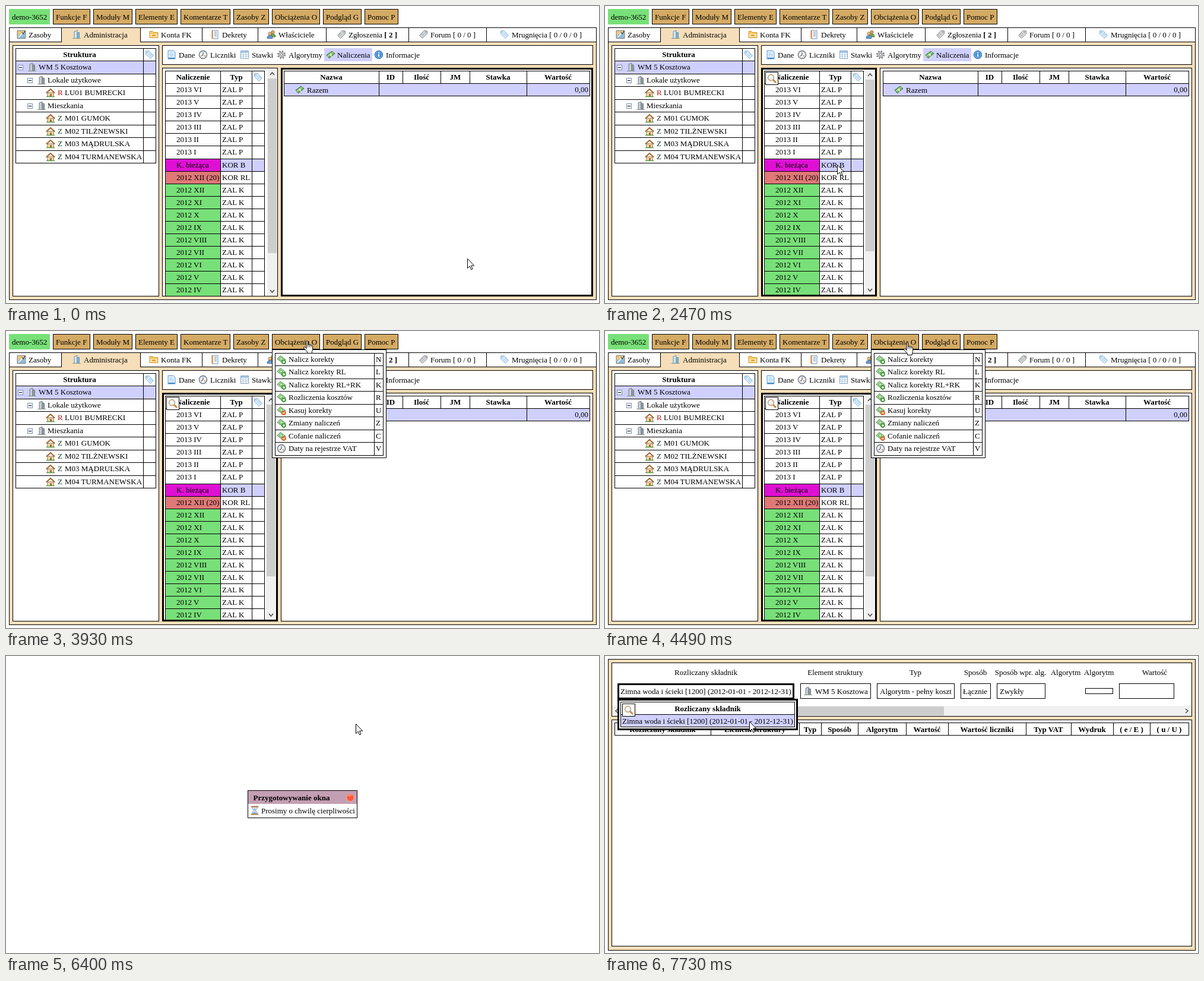
An HTML page for the animation above (8000 ms loop, 999 by 500 pixels).

```html
<!DOCTYPE html>
<html lang="pl">
<head>
<meta charset="utf-8">
<title>Naliczenia</title>
<style>
html, body { margin: 0; width: 100%; height: 100%; overflow: hidden; background: #fff; }
svg { display: block; width: 999px; height: 500px; }
text { font: 13px "Liberation Serif", "Times New Roman", serif; white-space: pre; }
.b { font-weight: bold; }
.m { text-anchor: middle; }
.e { text-anchor: end; }
rect { shape-rendering: crispEdges; }
</style>
</head>
<body>
<svg id="stage" viewBox="0 0 999 500"></svg>
<script>
const LAV = '#d0d0ff', TAN = '#d4ab65', WHEAT = '#f5deb9', GREEN = '#78e078';

// Drawing helpers: right and bottom edges are exclusive
const fill = (x, y, x2, y2, c) => `<rect x="${x}" y="${y}" width="${x2 - x}" height="${y2 - y}" fill="${c}"/>`;
const box = (x, y, x2, y2, c = '#fff', w = 1) => fill(x, y, x2, y2, '#000') + fill(x + w, y + w, x2 - w, y2 - w, c);
const frame = (x, y, x2, y2, w) =>
  `<rect x="${x + w / 2}" y="${y + w / 2}" width="${x2 - x - w}" height="${y2 - y - w}" fill="none" stroke="#000" stroke-width="${w}"/>`;
const text = (x, y, s, cls = '', c = '#000') => `<text x="${x}" y="${y}" class="${cls}" fill="${c}">${s}</text>`;
const grid = (xs, ys) => {
  const [x0, x1, y0, y1] = [xs[0], xs[xs.length - 1], ys[0], ys[ys.length - 1]];
  return xs.map(x => fill(x, y0, x + 1, y1 + 1, '#000')).join('') +
    ys.map(y => fill(x0, y, x1 + 1, y + 1, '#000')).join('');
};
const group = (id, s) => `<g id="${id}">${s}</g>`;
const path = (d, f = 'none', s = 'none', w = 1) => `<path d="${d}" fill="${f}" stroke="${s}" stroke-width="${w}"/>`;
const disc = (x, y, r, f, s = 'none', w = 1) => `<circle cx="${x}" cy="${y}" r="${r}" fill="${f}" stroke="${s}" stroke-width="${w}"/>`;

const note = path('M1 8.5L10 2l5 4-9.5 8z', '#6fae63', '#3f7f3a') + path('M3 10.5L12 4M6 7l4 4', 'none', '#cfe8c0', 1.2) + disc(8, 8, 1.8, '#d9efcd');
const cash = path('M1 7L6 1.5l9 6.5-5 6z', '#a9d79b', '#4c9447') + path('M4 6.5l6 5', 'none', '#5ea657') + disc(7.5, 7, 2, '#e3f4da', '#6bad62');
const tag = (f, s) => path('M1.5 2L7 1.5 14.5 9.500 9.500 14.500 1.500 7z', f, s) + disc(4, 4, 1.2, '#fff', s, .8) + path('M6 6.500l4.500 4.500M8 5l4.500 4.500', 'none', s, .7);
const icons = {
  tag: tag('#d9ecfa', '#83b4dc'),
  grayTag: `<g transform="matrix(-1 0 0 1 16 0)">${tag('#d6d9dc', '#85898d')}</g>`,
  house: path('M3 8h10v6.500H3z', '#f3e2b4', '#8d6b3c') + path('M.8 8.500L8 2l7.200 6.500', 'none', '#a5632b', 2) +
    fill(7, 10, 10, 14, '#a2683a') + path('M1 14.500h14', 'none', '#5c9a42', 1.500),
  building: path('M4 3l5-2v13.500H4z', '#b9c0c5', '#7d868d') + path('M9 3.500l3.500 1v10H9z', '#8f999f', '#747e85') +
    path('M5.500 4.500h2M5.500 7h2M5.500 9.500h2M5.500 12h2', 'none', '#f2f6f8', 1.200) + path('M1 14.500h14', 'none', '#8a9a8a'),
  blueHouse: path('M4 3l5-2v13.500H4z', '#c2dced', '#6f98b4') + path('M9 4.500h3.500v10H9z', '#86b0cc', '#6f98b4') +
    path('M5.500 4.500h2M5.500 7h2M5.500 9.500h2M5.500 12h2', 'none', '#fff', 1.200) + path('M1 14.500h14', 'none', '#7b9a85'),
  map: path('M1 1.500h14v13H1z', '#f3ca79', '#71777c') + path('M2 10l4-4 3 3 5-6v11H2z', '#8fbede') + path('M3 13L12 3', 'none', '#fff', 1.400) + path('M9 4l2 3 3-5', 'none', '#4a5661', 1.500),
  folder: path('M1 13.500v-11h5l1.500 2H15v9z', '#f6c866', '#d29835') + path('M2 7h12v5.500H2z', '#fde6a6') + path('M5 9.500h6', 'none', '#d88a28', 2),
  ledger: path('M3.500 1h9.500v14H3.500z', '#eef5fc', '#7797b8') + path('M3.500 1v14', 'none', '#d87b33', 2) + path('M7 4h4M7 7h4M7 10h4', 'none', '#6387b5'),
  people: disc(10.500, 4, 2.600, '#e4ac6d', '#8f6336') + path('M6 12q0-5 4.500-5T15 12z', '#72aa4c', '#4f7d34') +
    disc(5.500, 6.500, 2.500, '#f1c48b', '#9c6d3c') + path('M1 14.500q0-5 4.500-5t4.500 5z', '#6d9bd1', '#43689a'),
  doc: path('M2 1h9l3 3v11H2z', '#dceefc', '#5e9bd0') + path('M4.500 5h5M4.500 7.500h7M4.500 10h7', 'none', '#a9cdec') + path('M2.500 14h11', 'none', '#4286c1', 2),
  clock: disc(8, 8, 6.500, '#f2f3f4', '#858d97', 1.800) + path('M8 4v4l-3 2.500', 'none', '#546273', 1.200) + disc(11, 10, 1.200, '#e09a44'),
  sheet: path('M1.500 1.500h13v13h-13z', '#f7fbff', '#84a5c4') + path('M2 3.500h12', 'none', '#a6c8e8', 3) + path('M2 8h12M2 11h12M5.500 5v9M10 5v9', 'none', '#b6cbdd'),
  gear: `<circle cx="8" cy="8" r="5.800" fill="none" stroke="#8b8f92" stroke-width="3" stroke-dasharray="2.400 2.150"/>` + disc(8, 8, 4.500, '#c8cbcd', '#85898c') + disc(8, 8, 1.800, '#fff', '#85898c'),
  info: disc(8, 8, 6.700, '#4590d8', '#2968ab') + disc(8, 8, 5.300, 'none', '#9bcaf3', .8) + path('M8 7v4.500M8 4v1.800', 'none', '#fff', 2),
  note,
  plus: cash + disc(12, 12, 3.500, '#4caa40', '#2c7b28', .8) + path('M10 12h4M12 10v4', 'none', '#fff', 1.300),
  minus: cash + disc(12, 12, 3.500, '#ee7933', '#ba4a18', .8) + path('M10 12h4', 'none', '#fff', 1.300),
  fold: fill(0, 0, 9, 9, '#7a93b5') + fill(1, 1, 8, 8, '#f2f5f9') + fill(2, 4, 7, 5, '#000'),
  lens: path('M10 10l5 5', 'none', '#c98a3b', 2.800) + disc(6.500, 6.500, 5, '#eaf4fc', '#c09863', 1.300) + path('M4 6q.5-2 2.500-2.500', 'none', '#fff', 1.200),
  glass: path('M3.500 2.500q0 4 4 5.500-4 1.500-4 5.500h9q0-4-4-5.500 4-1.500 4-5.500z', '#eaf3fb', '#7c98b8') +
    path('M5.500 4.500h5L8 7.500zM4.500 13q1-2.500 3.500-3 2.500.5 3.500 3z', '#8fb8e4') + path('M1.500 1.500h13M1.500 14.500h13', 'none', '#b1824b', 2)
};
const icon = (name, x, y) => `<g transform="translate(${x} ${y})">${icons[name]}</g>`;
const lens = (x, y) => box(x, y, x + 22, y + 22) + icon('lens', x + 3, y + 3);
const chevron = (x, y, dx, dy) => path(`M${x - 3.5 * dy - 2 * dx} ${y - 3.5 * dx - 2 * dy}L${x + 2 * dx} ${y + 2 * dy}L${x + 3.5 * dy - 2 * dx} ${y + 3.5 * dx - 2 * dy}`, 'none', '#505050', 1.6);
const steps = (y, pitch, n) => Array.from({ length: n + 1 }, (_, i) => y + pitch * i);

function topBar() {
  const tabs = [
    [5, 18, 'map', 'Zasoby'], [93, 111, 'blueHouse', 'Administracja'], [226, 241, 'folder', 'Konta FK'],
    [330, 344, 'ledger', 'Dekrety'], [424, 439, 'people', 'Właściciele'],
    [539, 557, 'grayTag', 'Zgłoszenia <tspan class="b">[ 2 ]</tspan>'],
    [678, 695, 'grayTag', 'Forum [ 0 / 0 ]'], [809, 832, 'tag', 'Mrugnięcia [ 0 / 0 / 0 ]']
  ];
  const buttons = [
    [79, 142, 'Funkcje F'], [147, 213, 'Moduły M'], [218, 289, 'Elementy E'], [294, 378, 'Komentarze T'],
    [383, 443, 'Zasoby Z'], [448, 529, 'Obciążenia O'], [534, 599, 'Podgląd G'], [604, 661, 'Pomoc P']
  ];
  return fill(5, 5, 74, 31, GREEN) + text(10, 23, 'demo-3652') +
    buttons.map(([a, b, s]) => box(a, 5, b, 31, TAN) + text(a + 5, 23, s)).join('') +
    box(5, 60, 995, 495, WHEAT) + box(5, 36, 995, 61) + fill(94, 37, 226, 61, WHEAT) +
    tabs.map(([a, x, i, s]) => fill(a, 36, a + 1, 61, '#000') + icon(i, x, 40) + text(x + 20, 53, s)).join('');
}

function tree() {
  const ys = steps(71, 21.5, 9).map(Math.floor);
  const branch = (i, x, s) => icon('fold', x, ys[i] + 7) + icon('building', x + 16, ys[i] + 3) + text(x + (i == 1 ? 35 : 34), ys[i] + 15, s);
  const leaf = (i, k, s) => icon('house', 67, ys[i] + 3) +
    text(87, ys[i] + 15, k, '', k == 'R' ? '#b01010' : '#123a1c') + text(99, ys[i] + 15, s);
  return box(11, 66, 258, 489) + fill(16, 92, 253, 114, LAV) + grid([16, 231, 252], ys) +
    text(124, 86, 'Struktura', 'b m') + icon('tag', 234, 74) +
    branch(1, 20, 'WM 5 Kosztowa') + branch(2, 36, 'Lokale użytkowe') + leaf(3, 'R', 'LU01 BUMRECKI') +
    branch(4, 36, 'Mieszkania') +
    ['GUMOK', 'TILŻNEWSKI', 'MĄDRULSKA', 'TURMANEWSKA'].map((s, i) => leaf(5 + i, 'Z', `M0${i + 1} ${s}`)).join('');
}

function toolbar() {
  const items = [
    [271, 'doc', 'Dane'], [324, 'clock', 'Liczniki'], [394, 'sheet', 'Stawki'],
    [456, 'gear', 'Algorytmy'], [539, 'note', 'Naliczenia'], [620, 'info', 'Informacje']
  ];
  return box(263, 66, 989, 99) + fill(536, 71, 617, 93, LAV) +
    items.map(([x, i, s]) => icon(i, x, 74) + text(x + (i == 'note' ? 19 : 20), 87, s)).join('');
}

function list() {
  const ys = steps(109, 21.08, 18).map(Math.round);
  const y2013 = ['VI', 'V', 'IV', 'III', 'II', 'I'].map(m => ['2013 ' + m, 'ZAL P', '#fff']);
  const y2012 = ['XII', 'XI', 'X', 'IX', 'VIII', 'VII', 'VI', 'V', 'IV'].map(m => ['2012 ' + m, 'ZAL K', GREEN]);
  const rows = [...y2013, ['K. bieżąca', 'KOR B', '#df10d4'], ['2012 XII (20)', 'KOR RL', '#e07878'], ...y2012];
  const cells = rows.map(([, , c], i) => fill(268, ys[i + 1], 361, ys[i + 2], c)).join('');
  const labels = rows.map(([a, b], i) => text(287, ys[i + 1] + 15, a) + text(364, ys[i + 1] + 15, b)).join('');
  return box(263, 104, 458, 489) + cells + fill(361, ys[7], 436, ys[8], LAV) + grid([268, 361, 414, 435], ys) +
    text(315, 124, 'Naliczenie', 'b m') + text(388, 124, 'Typ', 'b m') + icon('tag', 417, 112) + labels;
}

const vScroll = (x, y, y2, t, b) => fill(x, y, x + 17, y2, '#f0f0f0') + fill(x + 1, t, x + 16, b, '#cdcdcd') +
  chevron(x + 8.5, y + 9, 0, -1) + chevron(x + 8.5, y2 - 8, 0, 1);

function details() {
  const heads = [[548, 'Nazwa'], [648, 'ID'], [700, 'Ilość'], [757, 'JM'], [829, 'Stawka'], [930, 'Wartość']];
  return box(463, 104, 989, 489) + fill(468, 130, 984, 152, LAV) +
    grid([468, 628, 668, 732, 781, 877, 983], [109, 130]) + grid([468, 628, 877, 983], [130, 151]) +
    heads.map(([x, s]) => text(x, 124, s, 'b m')).join('') +
    icon('note', 487, 133) + text(507, 146, 'Razem') + text(981, 145, '0,00', 'e');
}

function menu() {
  const ys = steps(37, 21.5, 8).map(Math.floor);
  const items = [
    ['plus', 'Nalicz korekty', 'N'], ['plus', 'Nalicz korekty RL', 'L'], ['plus', 'Nalicz korekty RL+RK', 'K'],
    ['plus', 'Rozliczenia kosztów', 'R'], ['minus', 'Kasuj korekty', 'U'], ['plus', 'Zmiany naliczeń', 'Z'],
    ['minus', 'Cofanie naliczeń', 'C'], ['clock', 'Daty na rejestrze VAT', 'V']
  ];
  return box(448, 31, 641, 214) + grid([453, 620, 635], ys) +
    items.map(([i, s, k], n) => icon(i, 456, ys[n] + 3) + text(476, ys[n] + 15, s) + text(623, ys[n] + 15, k)).join('');
}

function dialog() {
  return box(407, 226, 592, 273) + fill(408, 227, 591, 249, '#c49fb3') + text(416.5, 243, 'Przygotowywanie okna', 'b') +
    disc(580, 238.5, 6.2, '#ff5638', '#f3a58c', 1.2) + path('M577 236.500q2-2.500 5-1.500', 'none', '#ffa890', 1.500) +
    icon('glass', 411, 252) + text(430, 265, 'Prosimy o chwilę cierpliwości');
}

function settlement() {
  const labels = [
    [170, 'Rozliczany składnik'], [388, 'Element struktury'], [523, 'Typ'], [624, 'Sposób'],
    [700, 'Sposób wpr. alg.'], [776, 'Algorytm'], [832, 'Algorytm'], [926, 'Wartość']
  ];
  const cols = [16, 178, 327, 364, 426, 507, 578, 709, 785, 856, 918, 983];
  const heads = ['Rozliczany składnik', 'Element struktury', 'Typ', 'Sposób', 'Algorytm', 'Wartość',
    'Wartość liczniki', 'Typ VAT', 'Wydruk', '( e / E )', '( u / U )'];
  const part = 'Zimna woda i ścieki [1200] (2012-01-01 - 2012-12-31)';
  return box(5, 5, 995, 496, WHEAT) + box(11, 11, 989, 102) + box(11, 107, 989, 489) +
    labels.map(([x, s]) => text(x, 32, s, 'm')).join('') +
    box(21, 46, 319, 73, '#fff', 3) + text(26, 64, part) +
    box(329, 46, 448, 72) + icon('building', 334, 51) + text(354, 64, 'WM 5 Kosztowa') +
    box(458, 46, 589, 72) + text(463, 64, 'Algorytm - pełny koszt') +
    box(599, 46, 650, 72) + text(603, 64, 'Łącznie') + box(660, 46, 742, 72) + text(665, 64, 'Zwykły') +
    box(809, 54, 856, 64) + box(866, 46, 959, 72) +
    fill(12, 84, 988, 101, '#f0f0f0') + fill(29, 85, 571, 100, '#cdcdcd') + chevron(20, 92.5, -1, 0) + chevron(980, 92.5, 1, 0) +
    grid(cols, [112, 133]) + heads.map((s, i) => text((cols[i] + cols[i + 1]) / 2, 128, s, 'b m')).join('') +
    box(21, 72, 325, 125, '#fff', 3) + fill(26, 99, 320, 119, LAV) + grid([26, 319], [77, 98, 119]) +
    text(173, 93, 'Rozliczany składnik', 'b m') + text(29, 114, part);
}

const arrow = path('M.5.500V16.500L4.200 13 6.700 18.700 9.100 17.700 6.600 12.100H11.700z', '#fff', '#000');
const hand = path('M-1 13.500V1.800Q-1 .5.300.5T1.600 1.800V7.500Q1.800 6.600 3 6.600T4.400 7.900Q4.700 7.100 5.800 7.200T7.100 8.500Q7.400 7.900 8.400 8T9.600 9.500V14.500Q9.600 17 8.400 18.500V21.500H.5V19L-5 13.200Q-6 11.500-4.700 10.900T-2.600 11.600Z', '#fff', '#000') +
  path('M1.600 7.500v4M4.400 8v3.500M7.100 8.500v3', 'none', '#000', .8);

document.getElementById('stage').innerHTML =
  fill(0, 0, 999, 500, '#fff') +
  group('main', topBar() + tree() + toolbar() + list() + details() +
    group('onRight', vScroll(440, 105, 488, 122, 416) + frame(463, 104, 989, 489, 3)) +
    group('onList', vScroll(438, 107, 486, 124, 413) + frame(263, 104, 458, 489, 3)) +
    group('listLens', lens(270, 111)) + group('menu', menu())) +
  group('wait', dialog()) +
  group('form', settlement() + group('formLens', lens(29, 80))) +
  group('cursor', group('arrow', arrow) + group('hand', hand));

const el = id => document.getElementById(id);
const show = (id, on) => el(id).setAttribute('display', on ? 'inline' : 'none');

// Pointer moves: first step, last step, step count, x, y, easing
const easeIn = u => u ** 1.6, easeOut = u => 1 - (1 - u) ** 2, smooth = u => u * u * (3 - 2 * u);
const moves = [
  [70, 150, 2, 645, 315, smooth], [450, 910, 7, 391, 267, smooth],
  [2930, 3160, 4, 464, 142, easeIn], [3236, 3620, 6, 508, 17, easeOut],
  [3850, 4000, 3, 506, 16, smooth], [4490, 4490, 1, 509, 19, smooth],
  [4566, 5250, 10, 588, 112, smooth], [5320, 5320, 1, 589, 114, smooth],
  [7030, 7730, 10, 243, 110, smooth]
];

function pointer(t) {
  let x = 777, y = 425;
  for (const [a, b, n, x2, y2, ease] of moves) {
    if (t < a) break;
    const k = t >= b ? n : Math.floor((t - a) / (b - a) * (n - 1)) + 1;
    const u = ease(k / n);
    x += (x2 - x) * u;
    y += (y2 - y) * u;
  }
  return [Math.round(x), Math.round(y)];
}

function draw(t) {
  const [x, y] = pointer(t);
  const onButton = t < 6250 && x >= 448 && x < 529 && y >= 5 && y < 31;
  show('main', t < 6250);
  show('onRight', t < 1460);
  show('onList', t >= 1460);
  show('listLens', t >= 2470);
  show('menu', t >= 3925);
  show('wait', t >= 6320 && t < 6480);
  show('form', t >= 6480);
  show('formLens', x < 325 && y < 125);
  show('hand', onButton);
  show('arrow', !onButton);
  el('cursor').setAttribute('transform', `translate(${x} ${y})`);
}

const start = performance.now();
function tick() {
  draw((performance.now() - start) % 8000);
  requestAnimationFrame(tick);
}
tick();
</script>
</body>
</html>
```
